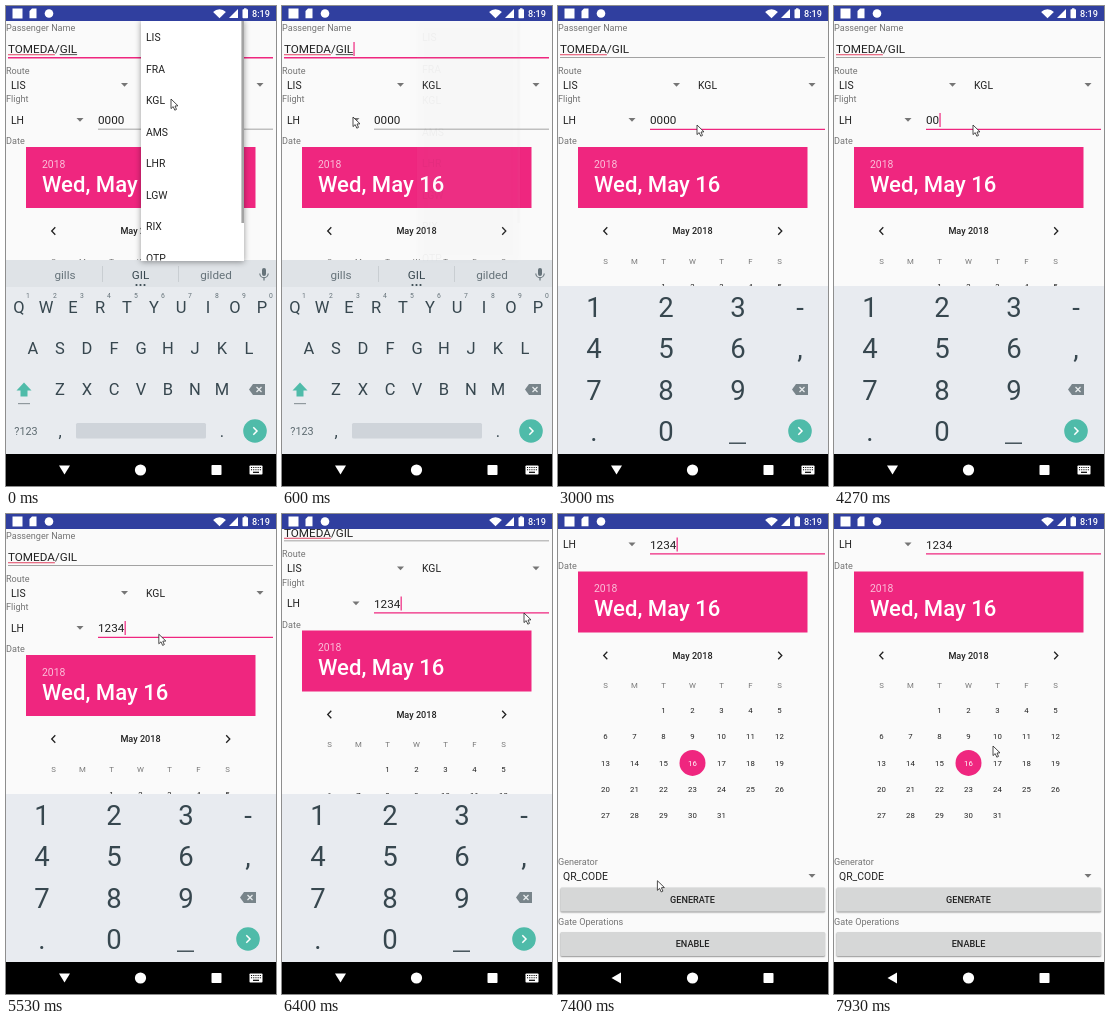
Recreate the animation shown at these times as an HTML page with a canvas. Size 270 by 480 pixels, loop 8 s.

```html
<!DOCTYPE html>
<html lang="en">
<head>
<meta charset="utf-8">
<title>Boarding pass form</title>
<style>
html, body { margin: 0; height: 100%; overflow: hidden; background: #000; }
canvas { display: block; width: 100vw; height: 100vh; }
</style>
</head>
<body>
<canvas></canvas>
<script>
const canvas = document.querySelector('canvas');
const ctx = canvas.getContext('2d');
const LOOP = 8000, PINK = '#ef267f', INK = '#212121', GREY = '#757575', KEY = '#37474f', TEAL = '#4fbba9';
const SURNAME = 'TOMEDA', GIVEN = 'GIL';
const FOCUS_FLIGHT = 2200, NUMERIC = 2400, HIDE = 7150;

// [time, x, y] of the pointer tip, [time, offset] of the page, [time, text] of the flight field
const pointerPath = [[0, 165, 93], [280, 165, 93], [580, 71, 111], [1500, 71, 111], [2000, 111, 112],
  [2250, 111, 112], [2700, 139, 119], [5450, 139, 119], [5800, 243, 128], [6070, 243, 128],
  [6400, 242, 99], [6480, 240, 94], [6800, 81, 449], [6930, 57, 460], [7130, 57, 460], [7750, 162, 229], [7900, 159, 232]];
const scrollPath = [[0, 0], [6200, 0], [6400, 24.5], [6480, 50], [6600, 80], [6800, 101], [6920, 104], [7180, 104], [7250, 83.5]];
const edits = [[0, '0000'], [3930, '000'], [4200, '00'], [4350, '0'], [4480, ''],
  [4750, '1'], [4950, '12'], [5150, '123'], [5350, '1234']];

const linear = p => p, smooth = p => p * p * (3 - 2 * p);
const clamp = v => Math.max(0, Math.min(1, v));

function along(path, t, ease) {
  const next = path.findIndex(p => p[0] > t);
  if (next < 0) return path[path.length - 1].slice(1);
  const a = path[next - 1], b = path[next];
  const p = ease((t - a[0]) / (b[0] - a[0]));
  return a.slice(1).map((v, i) => v + (b[i + 1] - v) * p);
}

// y is the middle of the capitals
function text(str, x, y, size, color = INK, align = 'left', weight = 400) {
  ctx.font = `${weight} ${size}px Roboto, sans-serif`;
  ctx.textAlign = align;
  ctx.fillStyle = color;
  ctx.fillText(str, x, y + size * 0.356);
  return ctx.measureText(str).width;
}
const centered = (str, x, y, size, color, weight) => text(str, x, y, size, color, 'center', weight);

function rect(x, y, w, h, color, radius = 0) {
  ctx.fillStyle = color;
  ctx.beginPath();
  ctx.roundRect(x, y, w, h, radius);
  ctx.fill();
}

function circle(x, y, r, color) {
  ctx.fillStyle = color;
  ctx.beginPath();
  ctx.arc(x, y, r, 0, 7);
  ctx.fill();
}

function shape(points, fill, stroke, width = 1, closed = true) {
  ctx.beginPath();
  points.forEach(([x, y]) => ctx.lineTo(x, y));
  if (closed) ctx.closePath();
  if (fill) { ctx.fillStyle = fill; ctx.fill(); }
  if (stroke) { ctx.strokeStyle = stroke; ctx.lineWidth = width; ctx.stroke(); }
}

function shadowed(blur, draw) {
  ctx.save();
  ctx.shadowColor = 'rgba(0,0,0,.4)';
  ctx.shadowBlur = blur * canvas.width / 270;
  ctx.shadowOffsetY = canvas.width / 270;
  draw();
  ctx.restore();
}

function spinner(value, x, y, arrowX) {
  text(value, x, y, 10.4);
  shape([[arrowX - 3.5, y - 2], [arrowX + 3.5, y - 2], [arrowX, y + 1.7]], '#757575');
}

function fieldLine(x, y, focused) {
  rect(x, y, 267 - x, focused ? 1.4 : 0.8, focused ? PINK : '#858585');
}

function button(label, y) {
  shadowed(1.5, () => rect(2.5, y, 264.5, 24, '#d6d7d7', 1.3));
  centered(label, 134.5, y + 12, 9.1, INK, 500);
}

function calendar() {
  rect(20, 141, 229.5, 61, PINK);
  text('2018', 36, 158, 10.4, 'rgba(255,255,255,.7)');
  text('Wed, May 16', 36, 178, 22.1, '#fff', 'left', 500);
  centered('May 2018', 134.5, 225, 9.1, INK, 500);
  for (const [x, d] of [[47.5, -1], [222, 1]])
    shape([[x - 1.8 * d, 221.3], [x + 1.8 * d, 225], [x - 1.8 * d, 228.7]], null, INK, 1.3, false);
  [...'SMTWTFS'].forEach((day, i) => centered(day, 47.5 + 29 * i, 255, 7.8, GREY));
  for (let day = 1; day <= 31; day++) {
    const cell = day + 1, x = 47.5 + 29 * (cell % 7), y = 280 + 26.2 * Math.floor(cell / 7);
    const chosen = day === 16;
    if (chosen) circle(x, y, 13, PINK);
    centered(String(day), x, y, 7.8, chosen ? '#fff' : INK);
  }
}

function form(t) {
  const onFlight = t >= FOCUS_FLIGHT;
  const [, flight] = edits.findLast(e => e[0] <= t);
  text('Passenger Name', 0, 22, 9.1, GREY);
  const first = text(SURNAME, 2, 43, 11.7);
  const slash = text('/', 2 + first, 43, 11.7);
  const givenX = 2 + first + slash;
  const last = text(GIVEN, givenX, 43, 11.7);
  rect(2, 48.3, first, 1, '#e0405f');
  if (!onFlight) rect(givenX, 48.3, last, 0.8, INK);
  fieldLine(2, 51, !onFlight);

  text('Route', 0, 64.5, 9.1, GREY);
  spinner('LIS', 5, 79, 118.5);
  spinner('KGL', 140, 79, 254);
  text('Flight', 0, 93, 9.1, GREY);
  spinner('LH', 5, 114, 74);
  const flightWidth = text(flight, 92, 114, 11.7);
  fieldLine(92, 122.7, onFlight);

  const lastEdit = edits.findLast(e => e[0] <= t)[0];
  const blinkStart = onFlight ? Math.max(FOCUS_FLIGHT, lastEdit) : 550;
  if (t >= blinkStart && (t - blinkStart) % 1000 < 500)
    rect(onFlight ? 92.3 + flightWidth : givenX + last + 0.3, onFlight ? 107 : 36, 1.2, 14, PINK);

  text('Date', 0, 135, 9.1, GREY);
  calendar();
  text('Generator', 0, 431.5, 9.1, GREY);
  spinner('QR_CODE', 5, 445.5, 254);
  button('GENERATE', 457);
  text('Gate Operations', 0, 491.5, 9.1, GREY);
  button('ENABLE', 501.5);
}

function popup(alpha) {
  ctx.save();
  ctx.globalAlpha = alpha;
  shadowed(6, () => rect(135, 14, 103, 241, '#fff'));
  ctx.beginPath();
  ctx.rect(135, 15, 103, 239.5);
  ctx.clip();
  ['LIS', 'FRA', 'KGL', 'AMS', 'LHR', 'LGW', 'RIX', 'OTP'].forEach((code, i) => text(code, 140, 31.7 + 31.45 * i, 10.4));
  rect(235.4, 15, 2.6, 202, '#a3a3a3');
  ctx.restore();
}

function backspace(x, y) {
  shape([[x - 8, y], [x - 4, y - 5.5], [x + 8, y - 5.5], [x + 8, y + 5.5], [x - 4, y + 5.5]], '#78848a');
  for (const d of [-1, 1])
    shape([[x - 0.5, y - 2.5 * d], [x + 4.5, y + 2.5 * d]], null, '#e8ebee', 1.3, false);
}

function enterKey(x) {
  circle(x, 425, 11.8, TEAL);
  shape([[x - 1.7, 421.3], [x + 2, 425], [x - 1.7, 428.7]], null, '#fff', 1.5, false);
}

function letterKeyboard() {
  rect(0, 254, 270, 194, '#e8ebef');
  rect(0, 254, 270, 27, '#dfe3e7');
  ['gills', GIVEN, 'gilded'].forEach((word, i) => centered(word, 59 + 75.5 * i, 268.5, 11.7, i === 1 ? KEY : '#66737a'));
  for (const x of [96, 172]) rect(x, 260, 0.8, 16, '#c3c9cd');
  for (const x of [130.5, 134.5, 138.5]) circle(x, 279, 1.1, KEY);
  rect(256, 262, 4, 8, '#66737a', 2);
  ctx.strokeStyle = '#66737a';
  ctx.lineWidth = 1.1;
  ctx.beginPath();
  ctx.arc(258, 267.5, 4.2, 0, Math.PI);
  ctx.stroke();
  rect(257.4, 271.5, 1.2, 3, '#66737a');

  [['QWERTYUIOP', 13, 301], ['ASDFGHJKL', 27, 342], ['ZXCVBNM', 54, 383.5]].forEach(([row, x, y]) =>
    [...row].forEach((letter, i) => centered(letter, x + 27 * i, y, 16.5, KEY)));
  [...'1234567890'].forEach((digit, i) => centered(digit, 22 + 27 * i, 290, 6.8, '#66737a'));
  shape([[18, 376.5], [25.5, 384.5], [21.5, 384.5], [21.5, 390.5], [14.5, 390.5], [14.5, 384.5], [10.5, 384.5]], TEAL);
  rect(12, 397, 12, 1.2, '#90999e');
  backspace(251, 383.5);
  centered('?123', 20, 425, 10.8, '#5c696f');
  centered(',', 54, 425, 16.5, KEY);
  rect(70, 417, 130, 15.5, '#cfd4da', 1.5);
  centered('.', 216, 425, 16.5, KEY);
  enterKey(249);
}

function numberKeyboard() {
  rect(0, 280, 270, 170, '#e8ebf0');
  ['123-', '456,', '789', '.0'].forEach((row, r) =>
    [...row].forEach((key, c) => centered(key, [36, 108, 180, 242][c], 301.5 + 41.2 * r, 27.5, KEY)));
  rect(171, 436.5, 17, 1.4, KEY);
  backspace(242, 383.5);
  enterKey(242);
}

function statusBar() {
  rect(0, 0, 270, 15, '#303f9f');
  rect(6.5, 2.5, 10, 10, '#fff');
  shape([[26, 2.5], [30.5, 2.5], [30.5, 12.3], [23.5, 12.3], [23.5, 5]], '#fff');
  circle(43, 7.5, 4.3, '#fff');
  ctx.fillStyle = '#fff';
  ctx.beginPath();
  ctx.moveTo(213.5, 12.3);
  ctx.arc(213.5, 12.3, 9, -Math.PI * 0.75, -Math.PI * 0.25);
  ctx.fill();
  shape([[223, 12], [232, 12], [232, 3]], '#fff');
  rect(236.5, 3.2, 5.5, 9, '#fff', 0.7);
  rect(238, 2.3, 2.5, 1.5, '#fff');
  text('8:19', 246, 7.6, 9.1, '#fff', 'left', 500);
}

function navBar(keyboardOpen) {
  rect(0, 448, 270, 32, '#000');
  shape(keyboardOpen ? [[53, 459.5], [64, 459.5], [58.5, 468.5]] : [[53.5, 464], [63, 458.5], [63, 469.5]], '#fff');
  circle(134.5, 464, 5.6, '#fff');
  rect(205.5, 459, 10, 10, '#fff', 0.8);
  if (!keyboardOpen) return;
  rect(243.5, 459.5, 13, 9, '#fff', 0.8);
  for (let i = 0; i < 10; i++) rect(245 + 2.2 * (i % 5), 461 + 2.2 * Math.floor(i / 5), 1.1, 1.1, '#000');
  rect(247, 465.7, 6, 1.2, '#000');
}

function pointer([x, y]) {
  const outline = [[0, 0], [0, 9.6], [2.2, 7.6], [3.8, 11.2], [5.5, 10.4], [4, 7], [7, 6.8]];
  shape(outline.map(([dx, dy]) => [x + dx, y + dy]), '#fff', '#222', 0.8);
}

function render(t) {
  const scale = canvas.width / 270;
  ctx.setTransform(scale, 0, 0, canvas.height / 480, 0, 0);
  rect(0, 0, 270, 480, '#fafafa');
  ctx.save();
  ctx.translate(0, -along(scrollPath, t, linear)[0]);
  form(t);
  ctx.restore();
  if (t < NUMERIC) {
    letterKeyboard();
  } else if (t < HIDE + 200) {
    ctx.save();
    ctx.translate(0, 170 * smooth(clamp((t - HIDE) / 200)));
    numberKeyboard();
    ctx.restore();
  }
  const popupAlpha = 1 - clamp((t - 400) / 207);
  if (popupAlpha > 0) popup(popupAlpha);
  statusBar();
  navBar(t < HIDE);
  pointer(along(pointerPath, t, smooth));
}

function resize() {
  canvas.width = innerWidth * devicePixelRatio;
  canvas.height = innerHeight * devicePixelRatio;
}

let start;
function frame(now) {
  start ??= now;
  render((now - start) % LOOP);
  requestAnimationFrame(frame);
}
addEventListener('resize', resize);
resize();
requestAnimationFrame(frame);
</script>
</body>
</html>
```
